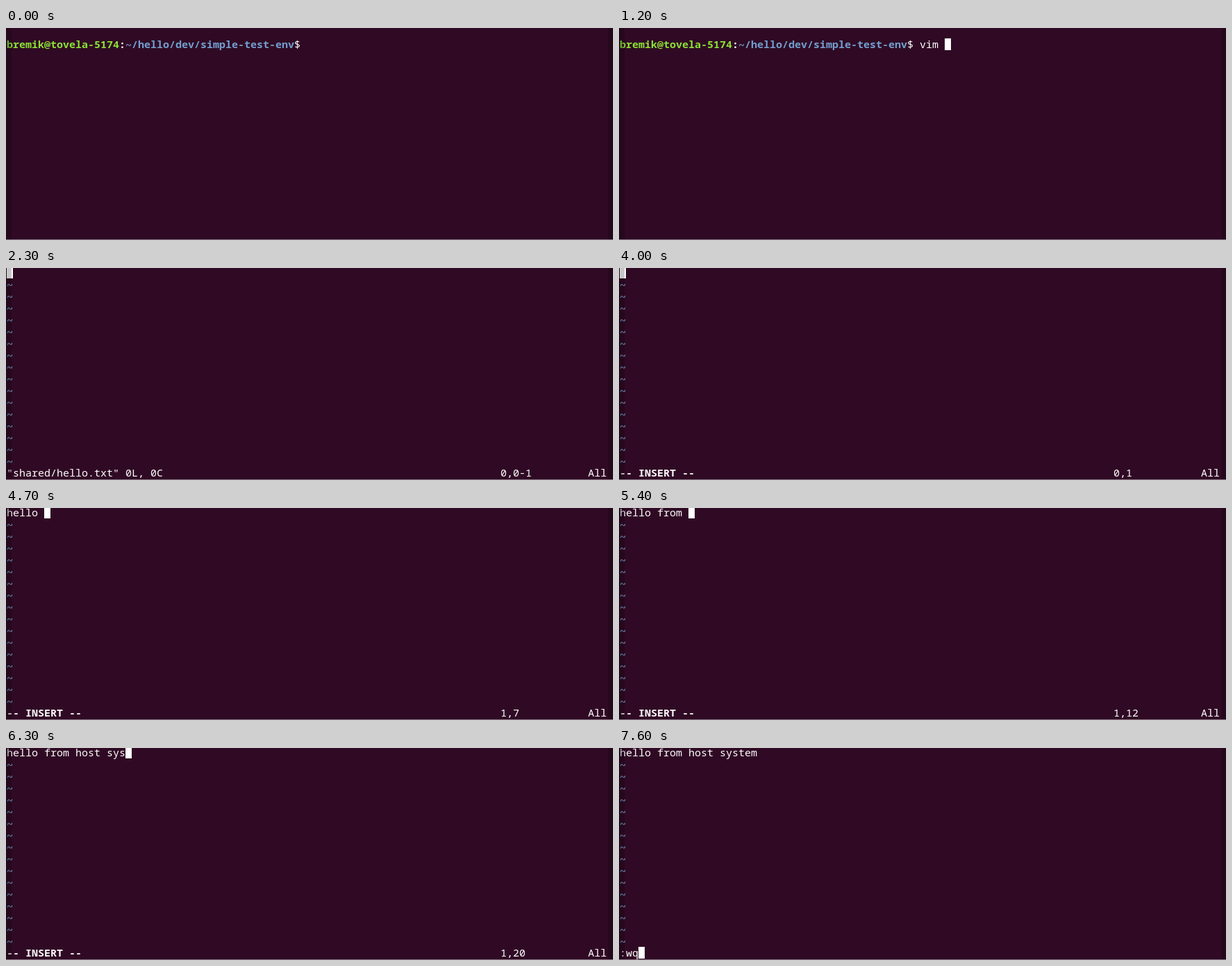
Recreate the animation shown at these times as an HTML page with a canvas. Size 874x306 px, loop 8 s.

```html
<!DOCTYPE html>
<html lang="en">
<head>
<meta charset="utf-8">
<title>Terminal</title>
<style>
  html, body { margin: 0; width: 100%; height: 100%; overflow: hidden; background: #300a24; }
  canvas { display: block; }
</style>
</head>
<body>
<canvas id="term" width="874" height="306"></canvas>
<script>
const ctx = document.getElementById('term').getContext('2d');
const W = 874, H = 306, LOOP = 8000;
const CELL_W = 9, CELL_H = 17, LEFT = 1, TOP = -2, ASCENT = 14, TILDE_DROP = 1;
const LAST_ROW = 17;
const TICK = 100, BLINK = 600;
const BG = '#300a24', WHITE = '#ffffff', GREEN = '#8ae234', BLUE = '#729fcf';
const FONT = '15px "Noto Sans Mono", "DejaVu Sans Mono", monospace';

const USER = 'bremik@tovela-5174', DIR = '~/hello/dev/simple-test-env';

// One entry per tick; an empty entry is a pause, a long one a completion.
const PAUSE = '';
const SHELL_KEYS = [...'vim sh', 'ared/', PAUSE, 'hello.txt '];
const EDIT_KEYS = ['he', PAUSE, 'l', PAUSE, ...'lo ', PAUSE, ...'from', PAUSE,
  ...' host ', PAUSE, ...'sys', PAUSE, 'te', 'm'];

const typed = (keys, start, t) =>
  keys.slice(0, Math.max(0, Math.floor((t - start) / TICK) + 1)).join('');
const blinkOn = (start, t) => (t - start + 2 * BLINK) % (2 * BLINK) < BLINK;
const cellX = col => LEFT + col * CELL_W;
const cellY = row => TOP + row * CELL_H;

function text(str, col, row, color = WHITE, bold = false) {
  ctx.font = (bold ? 'bold ' : '') + FONT;
  ctx.fillStyle = color;
  [...str].forEach((ch, i) => {
    const drop = ch === '~' ? TILDE_DROP : 0;
    ctx.fillText(ch, cellX(col + i), cellY(row) + ASCENT + drop);
  });
}

function cursor(col, row) {
  ctx.fillStyle = WHITE;
  ctx.fillRect(cellX(col), cellY(row), CELL_W, CELL_H);
}

function shell(t) {
  const dirCol = USER.length + 1;
  const inputCol = dirCol + DIR.length + 2;
  const input = typed(SHELL_KEYS, 900, t);
  text(USER, 0, 1, GREEN, true);
  text(':', USER.length, 1, WHITE, true);
  text(DIR, dirCol, 1, BLUE, true);
  text('$', inputCol - 2, 1);
  text(input, inputCol, 1);
  if (input || blinkOn(200, t)) cursor(inputCol + input.length, 1);
}

function ruler(pos) {
  text(pos, 79, LAST_ROW);
  text('All', 93, LAST_ROW);
}

function editor(t) {
  const line = typed(EDIT_KEYS, 4100, t), n = line.length;
  for (let row = 1; row < LAST_ROW; row++) text('~', 0, row, BLUE, true);
  text(line, 0, 0);

  if (t < 4000) {
    text('"shared/hello.txt" 0L, 0C', 0, LAST_ROW);
    ruler('0,0-1');
    if (blinkOn(2200, t)) cursor(0, 0);
  } else if (t < 7100) {
    text('-- INSERT --', 0, LAST_ROW, WHITE, true);
    ruler(n ? '1,' + (n + 1) : '0,1');
    cursor(n, 0);
  } else if (t < 7400) {
    cursor(n - 1, 0);
    text(line[n - 1], n - 1, 0, BG);
  } else {
    const cmd = t < 7600 ? ':' : ':wq';
    text(cmd, 0, LAST_ROW);
    cursor(cmd.length, LAST_ROW);
  }
}

function edges() {
  ctx.fillStyle = 'rgba(0, 0, 0, 0.22)';
  ctx.fillRect(0, 0, 8, H);
  ctx.fillRect(867, 0, W - 867, H);
  ctx.fillStyle = '#83747e';
  ctx.fillRect(0, H - 1, W, 1);
}

function draw(t) {
  ctx.fillStyle = BG;
  ctx.fillRect(0, 0, W, H);
  (t < 2300 ? shell : editor)(t);
  edges();
}

const start = performance.now();
function tick() {
  draw((performance.now() - start) % LOOP);
  requestAnimationFrame(tick);
}
tick();
</script>
</body>
</html>
```
